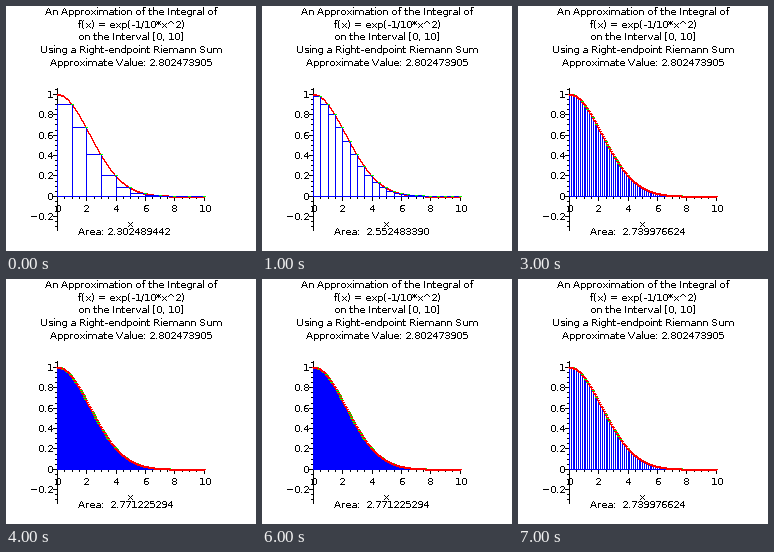
Recreate the animation shown at these times as a matplotlib script. Size 250 by 245 pixels, loop 8 s.

```python
import numpy as np
import matplotlib as mpl
import matplotlib.pyplot as plt
from matplotlib.animation import FuncAnimation
from matplotlib.collections import LineCollection

# crisp, whole-pixel text
mpl.rcParams.update({
    "font.family": "DejaVu Sans",
    "text.antialiased": False,
    "text.hinting": "native",
    "text.hinting_factor": 1,
})

W, H, DPI = 250, 245, 100
PX = 72 / DPI
X0, Y0 = 51, 190
UNIT_X, UNIT_Y = 14.65, 102
COUNTS = [10, 20, 40, 80, 160, 320, 160, 80]
TITLE = [
    "An Approximation of the Integral of",
    "f(x) = exp(-1/10*x^2)",
    "on the Interval [0, 10]",
    "Using a Right-endpoint Riemann Sum",
    "Approximate Value: 2.802473905",
]


def f(x):
    return np.exp(-x * x / 10)


def to_px(x, y):
    """Centre of the pixel that holds a data point."""
    return (np.floor(X0 + UNIT_X * x + 0.5) + 0.5,
            np.floor(Y0 - UNIT_Y * y + 0.3) + 0.5)


fig = plt.figure(figsize=(W / DPI, H / DPI), dpi=DPI, facecolor="white")
ax = fig.add_axes([0, 0, 1, 1])
ax.set_xlim(0, W)
ax.set_ylim(H, 0)
ax.axis("off")


def label(x, y, s, ha="center"):
    return ax.text(x, y, s, ha=ha, va="baseline", fontsize=10 * PX, color="black")


def strokes(color, z, segments=()):
    lines = LineCollection(list(segments), colors=color, linewidths=PX,
                           antialiaseds=False, capstyle="projecting", zorder=z)
    lines.set_snap(False)
    ax.add_collection(lines)
    return lines


def pixels(xs, ys):
    return [[(x - .02, y), (x + .02, y)] for x, y in zip(xs, ys)]


def draw_axes():
    x0, y0 = to_px(0, 0)
    lines = [[(x0, 82.5), (x0, 224.5)], [(x0, y0), (198.5, y0)]]
    for k in range(-6, 22):
        _, y = to_px(0, k / 20)
        major = k % 4 == 0 and k >= -4
        lines.append([(x0, y), (x0 - (4 if major else 2), y)])
        if major:
            label(47, y + 3.5, f"{k / 20:g}".replace("-", "\u2212"), "right")
    for k in range(21):
        x, _ = to_px(k / 2, 0)
        major = k % 4 == 0
        lines.append([(x, y0), (x, y0 + (4 if major else 2))])
        if major:
            label(x, 206, f"{k // 2}")
    label(124.5, 221, "x")
    strokes("black", 1, lines)


for i, row in enumerate(TITLE):
    label(125, round(9 + 12.75 * i), row)
draw_axes()

# the curve: one pixel per column, joined by vertical runs
cols = np.arange(148)
cx, cy = to_px(cols / UNIT_X, f(cols / UNIT_X))
runs = [[(x, a), (x, max(a, b - 1) + .02)] for x, a, b in zip(cx, cy, np.append(cy[1:], cy[-1]))]
strokes("#ff0000", 3, runs)
crest = strokes("#ff0000", 5, pixels(cx, cy))

bars = strokes("#0000ff", 2)
dots = strokes("#00ff00", 4)
area = label(72, 229, "", "left")


def draw(i):
    n = COUNTS[i]
    h = 10 / n
    right = h * np.arange(1, n + 1)
    xl, base = to_px(right - h, 0 * right)
    xr, top = to_px(right, f(right))
    bars.set_segments([[(a, b), (a, c), (d, c), (d, b), (a, b)]
                       for a, b, c, d in zip(xl, base, top, xr)])
    dots.set_segments(pixels(xr, top))
    # thin bars sit behind the curve, wide ones in front
    thin = n >= 80
    bars.set_zorder(2 if thin else 3.5)
    crest.set_visible(thin)
    gap = " " if n == 10 else "  "
    area.set_text(f"Area:{gap}{h * f(right).sum():.9f}")
    return bars, dots, crest, area


anim = FuncAnimation(fig, draw, frames=len(COUNTS), interval=1000,
                     repeat=True, repeat_delay=0, blit=False)
plt.show()
```
